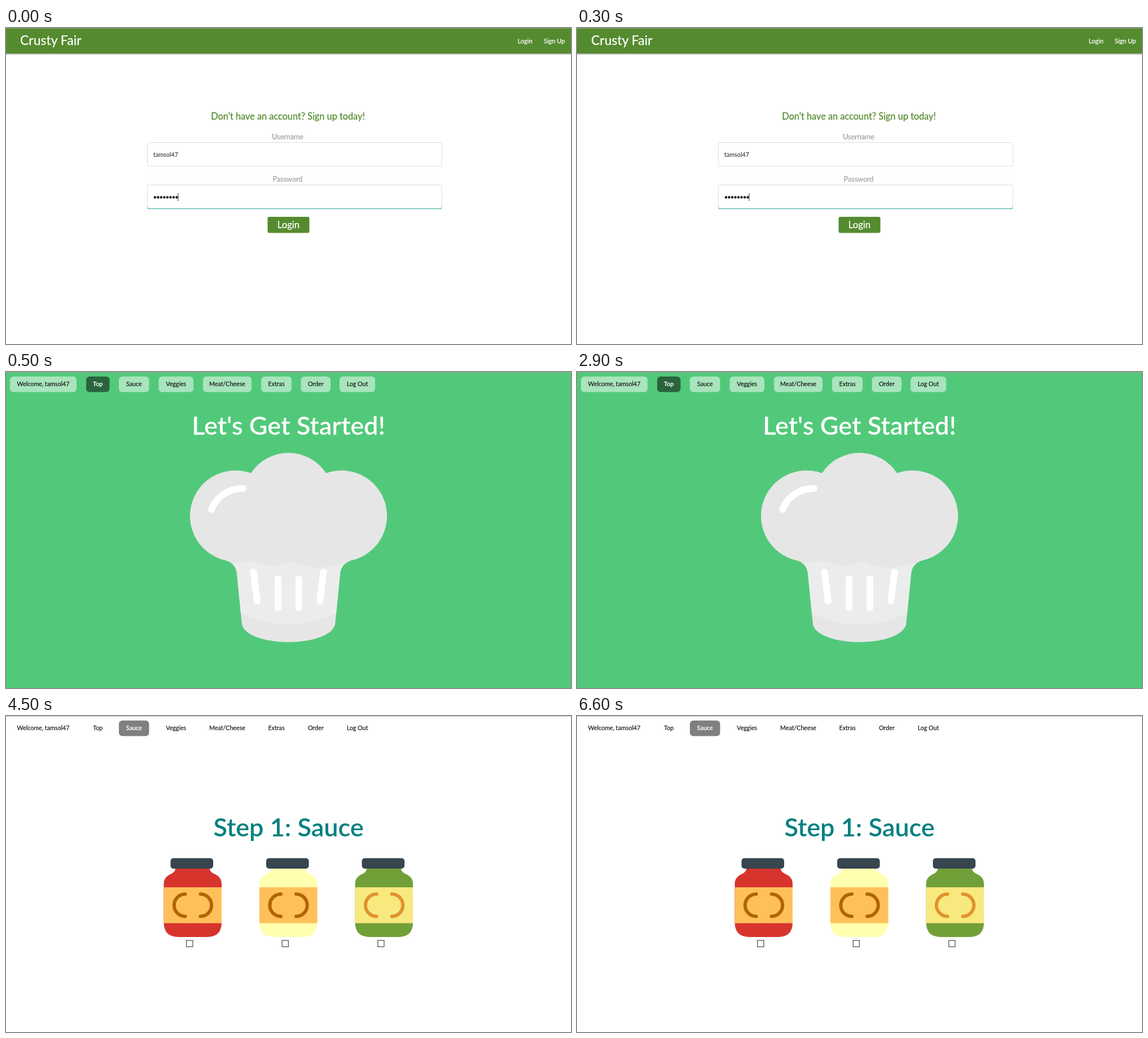
These frames come from a looping animation (1001x559 px, 8000 ms). An HTML page:

```html
<!DOCTYPE html>
<html lang="en">
<head>
<meta charset="utf-8">
<title>Order flow</title>
<style>
  html, body { margin: 0; width: 100%; height: 100%; overflow: hidden; background: #fff; }
  svg { display: block; width: 1001px; height: 559px; font-family: Lato, "Open Sans", sans-serif; }
  .mid { text-anchor: middle; }
  .scene { visibility: hidden; animation: 8s step-end infinite; }
  #login { animation-name: login; }
  #start { animation-name: start; }
  #sauce { animation-name: sauce; }
  @keyframes login { 0% { visibility: visible; } 6.25%, 100% { visibility: hidden; } }
  @keyframes start { 0% { visibility: hidden; } 6.25% { visibility: visible; } 56.25%, 100% { visibility: hidden; } }
  @keyframes sauce { 0% { visibility: hidden; } 56.25%, 100% { visibility: visible; } }
  .bar { fill: #fff; stroke: #fff; stroke-width: .25; }
  .small { font-size: 11.1px; }
  .label { font-size: 12.6px; fill: #9e9e9e; stroke: #9e9e9e; stroke-width: .2; }
  .field { fill: #fff; stroke: #dcdcdc; }
  .heading { font-size: 45px; font-weight: 600; }
  .tab { font-size: 10.7px; fill: #111; stroke: #111; stroke-width: .15; }
  .tab.on { fill: #fff; stroke: none; font-weight: 700; }
  .shine { fill: none; stroke: #fff; stroke-width: 12; stroke-linecap: round; }
  .mark { fill: none; stroke-width: 6; stroke-linecap: round; }
</style>
</head>
<body>
<svg viewBox="0 0 1001 559">
  <defs>
    <linearGradient id="shade" x2="0" y2="1">
      <stop stop-color="#000" stop-opacity=".38"/>
      <stop offset="1" stop-color="#000" stop-opacity="0"/>
    </linearGradient>
    <path id="hat" d="M434 179A79.5 79.5 0 0 1 567 179A80.5 80.5 0 1 1 613 333Q594 338 592 356L583 447C571 488 430 488 418 447L409 356Q407 338 388 333A80.5 80.5 0 1 1 434 179Z"/>
    <clipPath id="hatClip"><use href="#hat"/></clipPath>
  </defs>

  <g id="login" class="scene">
    <rect width="1001" height="559" fill="#fff"/>
    <rect y="45" width="1001" height="3" fill="url(#shade)"/>
    <rect width="1001" height="45" fill="#558b2f"/>
    <rect width="1001" height="1" fill="#8fa581"/>
    <text class="bar" x="25" y="30" font-size="23">Crusty Fair</text>
    <text class="bar small mid" x="919.5" y="26.5">Login</text>
    <text class="bar small mid" x="971.5" y="26.5">Sign Up</text>
    <text class="mid" x="499.5" y="162" font-size="16.3" fill="#558b2f" stroke="#558b2f" stroke-width=".25">Don't have an account? Sign up today!</text>
    <text class="label mid" x="499" y="197">Username</text>
    <rect class="field" x="250.5" y="202.5" width="521.5" height="42" rx="3"/>
    <text x="261" y="227.5" font-size="10.8" fill="#222">tamsol47</text>
    <text class="label mid" x="499" y="272">Password</text>
    <rect class="field" x="250.5" y="277.5" width="521.5" height="42" rx="3"/>
    <path d="M251 317.5Q251 319.7 254 319.7H769Q771.5 319.7 771.5 317.5" fill="none" stroke="#4db6ac" stroke-width="1.3"/>
    <path d="M264 299.5h39" stroke="#111" stroke-width="4.4" stroke-linecap="round" stroke-dasharray="0 5.5"/>
    <path d="M305 292v14" stroke="#333"/>
    <rect x="463.5" y="334" width="74" height="28.5" rx="3" fill="#558b2f"/>
    <text class="bar mid" x="500.5" y="353.5" font-size="16.7">Login</text>
  </g>

  <g id="start" class="scene">
    <rect width="1001" height="559" fill="#52c97a"/>
    <rect width="1001" height="1" fill="#8fa899"/>
    <g class="tabs" data-on="1" data-fill="#2a643d" data-rest="#a8e4bc"></g>
    <text class="heading mid" x="500.5" y="111" fill="#fff">Let's Get Started!</text>
    <use href="#hat" fill="#e6e6e6"/>
    <path clip-path="url(#hatClip)" fill="#ebedec" d="M385 336Q412 340 437 333Q472 352 507 334Q550 358 608 334L585 427Q500 466 416 427Z"/>
    <path class="shine" d="M364 243A59 59 0 0 1 420 206M438.5 354L445 405M482 366V417M519 366V417M562.5 354L556 405"/>
  </g>

  <g id="sauce" class="scene">
    <rect width="1001" height="559" fill="#fff"/>
    <rect width="1001" height="1" fill="#bdbdbd"/>
    <g class="tabs" data-on="2" data-fill="#808080" data-rest="none"></g>
    <text class="heading mid" x="500.5" y="213" fill="#008080">Step 1: Sauce</text>
    <g id="jars"></g>
  </g>
</svg>
<script>
  // label, left edge, right edge
  const tabs = [
    ["Welcome, tamsol47", 7, 125], ["Top", 142, 183.5], ["Sauce", 200, 253.5],
    ["Veggies", 270.5, 332], ["Meat/Cheese", 349, 435], ["Extras", 452, 506],
    ["Order", 522.5, 575], ["Log Out", 591, 654]
  ];
  for (const nav of document.querySelectorAll(".tabs")) {
    const { on, fill, rest } = nav.dataset;
    nav.innerHTML = tabs.map(([name, left, right], i) => {
      const active = i === +on;
      return `<rect x="${left}" y="8" width="${right - left}" height="27.5" rx="6" fill="${active ? fill : rest}"/>
        <text class="tab mid${active ? " on" : ""}" x="${(left + right) / 2}" y="25.3">${name}</text>`;
    }).join("");
  }

  // sauce, label and mark colours
  const sauces = [
    ["#d7342d", "#ffc05c", "#b26500"],
    ["#ffffb0", "#ffc05c", "#b26500"],
    ["#72a038", "#f8e97f", "#e0942c"]
  ];
  document.getElementById("jars").innerHTML = sauces.map(([body, label, mark], i) =>
    `<g transform="translate(${i * 169.5})">
      <path fill="${body}" d="M300 268V270Q300 276 292 279.5Q279.5 285 279.5 297V365Q279.5 391 306 391H356Q382 391 382 365V297Q382 285 369.5 279.5Q361 276 361 270V268Z"/>
      <rect x="279.5" y="303" width="102.5" height="63.5" fill="${label}"/>
      <rect x="291.5" y="251.5" width="75.5" height="18.5" rx="5" fill="#37454f"/>
      <path class="mark" stroke="${mark}" d="M317.5 315A19.7 19.7 0 0 0 317.5 354.4M344.5 315A19.7 19.7 0 0 1 344.5 354.4"/>
      <rect x="319.7" y="397" width="11.2" height="11.2" fill="#fff" stroke="#555" stroke-width="1.3"/>
    </g>`).join("");
</script>
</body>
</html>
```
